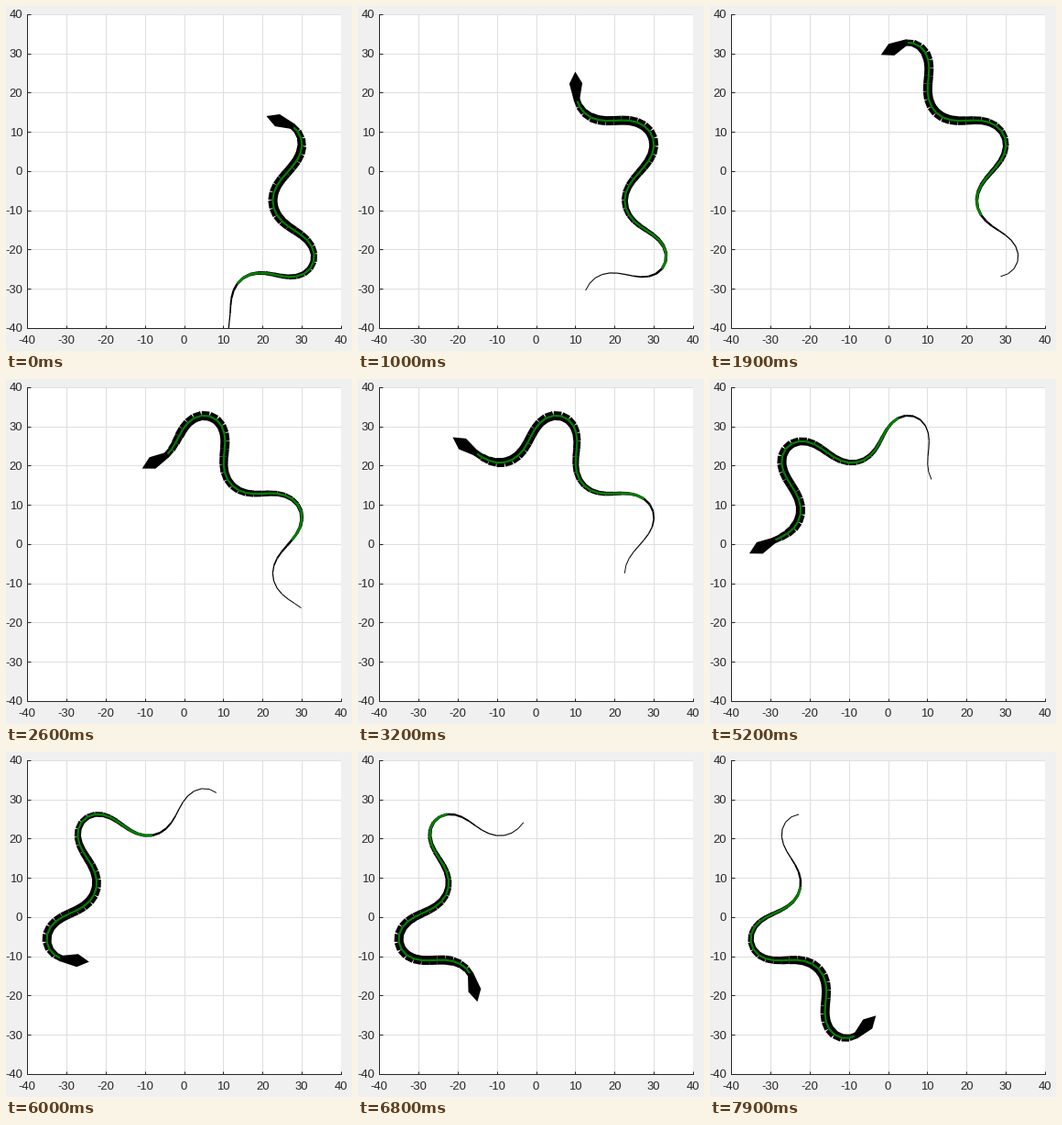
Animation, 378 px wide and 376 px high, one loop 8 s. Source, as a matplotlib script:

```python
import numpy as np
import matplotlib.pyplot as plt
from matplotlib.animation import FuncAnimation
from matplotlib.collections import LineCollection
from matplotlib.patches import Polygon

plt.rcParams["font.family"] = "Liberation Sans"
plt.rcParams["axes.unicode_minus"] = False

W, H, DPI = 378, 376, 100
PX = 72 / DPI             # points per pixel
FRAMES, STEP_MS = 80, 100
SEGMENTS, STEP = 43, 2.0  # body segments and their length
INK, GREEN = "#262626", "#008000"

PERIOD = 19.63            # steps per wave
SWING = 63.5              # amplitude of the heading wave, degrees
TURN = 60 / PERIOD        # steady left turn per step, degrees
PHASE = 21.7              # step at which the wave crosses its mean
STRAIGHT = 6.5            # the trail starts out straight until this step
HOLD = (36.4, 44.3)       # the steady turn pauses between these steps


def heading(n):
    """Serpentine heading at step n: a sine wave on a slow turn."""
    n = np.maximum(n, STRAIGHT)
    mean = 67.7 + TURN * (n - PHASE - np.clip(n - HOLD[0], 0, HOLD[1] - HOLD[0]))
    return np.radians(mean + SWING * np.sin(2 * np.pi * (n - PHASE) / PERIOD))


def direction(n):
    a = heading(n)
    return np.stack([np.cos(a), np.sin(a)], axis=-1)


moves = STEP * direction(np.arange(FRAMES + SEGMENTS) + 0.5)
track = np.vstack([[0, 0], np.cumsum(moves, axis=0)])
track += np.array([33.0, -23.1]) - track[22]

u = (np.arange(SEGMENTS) + 0.5) / SEGMENTS
body_w = np.interp(u, [0, 0.15, 0.25, 0.7, 0.92, 1], [0.9, 1.3, 2.6, 10, 10, 6.5])
striped = u > 0.25
stripe_w = np.interp(u[striped], [0.25, 0.55], [2.8, 2.2])

# Head outline: distance along the heading, sideways offset
HEAD = np.array([(-0.5, 0.7), (4, 1.65), (7, 0), (4, -1.65), (-0.5, -0.7)])

fig = plt.figure(figsize=(W / DPI, H / DPI), dpi=DPI, facecolor="#f0f0f0")
ax = fig.add_axes([23.05 / W, 25.05 / H, 343 / W, 342 / H])
ticks = np.arange(-40, 41, 10)
labels = [str(v) for v in ticks]
ax.set(xlim=(-40, 40), ylim=(-40, 40), facecolor="white")
ax.set_xticks(ticks, labels)
ax.set_yticks(ticks, labels)
ax.set_axisbelow(True)
ax.grid(color="#dfdfdf", lw=PX)
ax.tick_params(direction="in", length=3.5 * PX, width=PX, color=INK,
               labelcolor=INK, labelsize=13 * PX)
ax.tick_params(axis="x", pad=8 * PX)
ax.tick_params(axis="y", pad=5 * PX)
ax.spines[["top", "right"]].set_visible(False)
for side in ("left", "bottom"):
    ax.spines[side].set(color=INK, linewidth=PX)

body = LineCollection([], colors="black", linewidths=body_w * PX,
                      capstyle="butt", zorder=3)
stripe = LineCollection([], colors=GREEN, linewidths=stripe_w * PX,
                        capstyle="butt", zorder=4)
head = Polygon(HEAD, closed=True, fc="black", ec="none", zorder=5)
for artist in (body, stripe):
    ax.add_collection(artist, autolim=False)
ax.add_patch(head)


def draw(n):
    pts = track[n:n + SEGMENTS + 1]
    segs = np.stack([pts[:-1], pts[1:]], axis=1)
    body.set_segments(segs)
    stripe.set_segments(segs[striped])
    d = direction(n + SEGMENTS + 0.9)
    side = np.array([-d[1], d[0]])
    head.set_xy(pts[-1] + HEAD[:, :1] * d + HEAD[:, 1:] * side)
    return body, stripe, head


anim = FuncAnimation(fig, draw, frames=FRAMES, interval=STEP_MS,
                     init_func=lambda: draw(0), repeat=True, repeat_delay=0)
plt.show()
```
